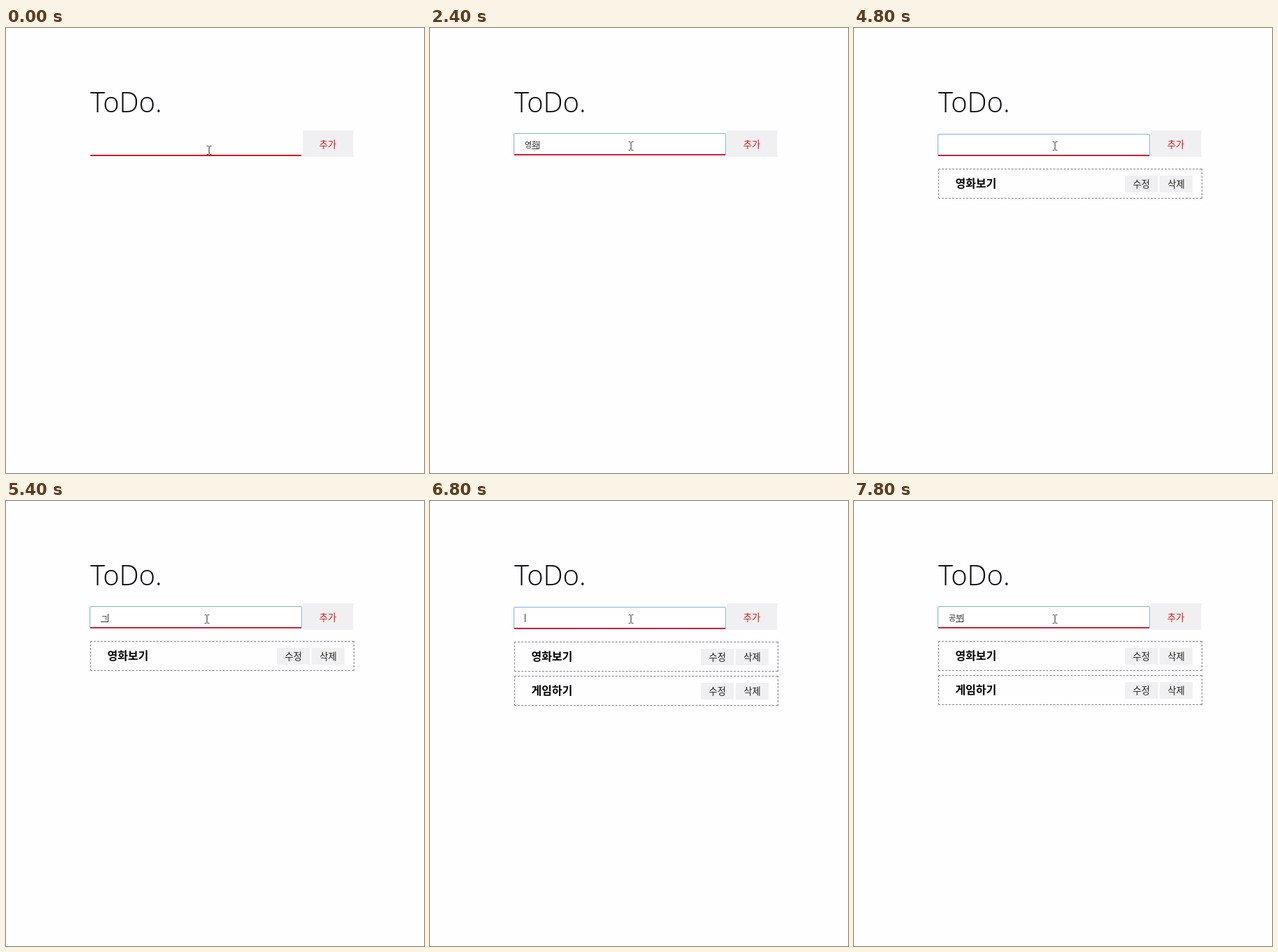
Write an HTML page with a canvas that moves like this. It is 600 by 639 pixels and loops after 8 s.

```html
<!DOCTYPE html>
<html lang="ko">
<head>
<meta charset="utf-8">
<title>ToDo</title>
<style>
html, body { margin: 0; width: 100%; height: 100%; overflow: hidden; background: #fefdff; }
canvas { display: block; }
</style>
</head>
<body>
<canvas id="stage" width="600" height="639"></canvas>
<script>
const ctx = document.getElementById('stage').getContext('2d');
const LOOP = 8000;
const KOREAN = '"Noto Sans CJK KR", "Noto Sans CJK", sans-serif';
const PAGE = '#fefdff', PANEL = '#f0eff1', RED = '#dc1a1d';
const TODOS = ['영화보기', '게임하기'];

// Each step: start time, typed text, caret shown, number of items.
const STEPS = [
  [0, '', false, 0],
  [400, '', true, 0],
  [1000, 'd', true, 0],
  [1200, '', true, 0],
  [1600, '', false, 0],
  [1800, '여', true, 0],
  [2000, '영', true, 0],
  [2400, '영화', true, 0],
  [2600, '영화보', true, 0],
  [2800, '영화보기', true, 0],
  [3000, '영화보기', true, 0, true],
  [3200, '', true, 1],
  [3800, '', false, 1],
  [4400, '', true, 1],
  [4800, '', false, 1],
  [5400, 'ㄱ', true, 1],
  [5600, '게', true, 1],
  [5800, '게임', true, 1],
  [6400, '게임하', true, 1],
  [6600, '게임하기', true, 1],
  [6800, '', true, 2],
  [7200, 'ㄱ', true, 2],
  [7400, '고', true, 2],
  [7600, '공', true, 2],
  [7800, '공부', true, 2]
];

function box(x, y, w, h, color) {
  ctx.fillStyle = color;
  ctx.fillRect(x, y, w, h);
}

function label(text, x, y, font, color = '#111', align = 'left') {
  ctx.font = font;
  ctx.fillStyle = color;
  ctx.textAlign = align;
  ctx.fillText(text, x, y);
}

function button(text, x, y) {
  box(x, y, 47, 24, PANEL);
  label(text, x + 23.5, y + 17, '13.33px ' + KOREAN, '#222', 'center');
}

function item(text, y) {
  ctx.strokeStyle = '#85858a';
  ctx.lineWidth = 1;
  ctx.setLineDash([3, 2]);
  ctx.beginPath();
  for (const edge of [y + 0.5, y + 42.5]) {
    ctx.moveTo(121, edge);
    ctx.lineTo(500, edge);
  }
  for (const edge of [121.5, 499.5]) {
    ctx.moveTo(edge, y);
    ctx.lineTo(edge, y + 43);
  }
  ctx.stroke();
  ctx.setLineDash([]);
  label(text, 145.5, y + 27, 'bold 16px ' + KOREAN, '#000');
  button('수정', 389, y + 10);
  button('삭제', 439, y + 10);
}

function input(focused, lift) {
  if (!focused) {
    box(121, 182, 303, 2, RED);
    return;
  }
  ctx.beginPath();
  ctx.roundRect(120.5, 152.5 - lift, 304, 31, 1.5);
  ctx.fillStyle = '#fff';
  ctx.fill();
  ctx.strokeStyle = '#7fb0ea';
  ctx.lineWidth = 1;
  ctx.stroke();
  box(121, 182 - lift, 303, 2, '#cf2038');
}

function typed(text, caret, committed) {
  ctx.font = '11px ' + KOREAN;
  const width = ctx.measureText(text).width;
  label(text, 136, 172, ctx.font, '#222');
  const korean = text && text !== 'd';
  if (korean && !committed) {
    const last = ctx.measureText(text.slice(-1)).width;
    box(Math.round(136 + width - last), 173, Math.round(last), 1, '#333');
  }
  if (caret) box(Math.round(136 + width), 162, 1, 12, '#333');
}

function pointer(x, y) {
  box(x, y - 5, 1, 11, '#333');
  for (const edge of [y - 6, y + 6]) {
    box(x - 3, edge, 3, 1, '#555');
    box(x + 1, edge, 3, 1, '#555');
  }
}

function draw(time) {
  const [, text, caret, count, committed] = STEPS.findLast(step => step[0] <= time);
  const lift = text && text !== 'd' ? 1 : 0;

  box(0, 0, 600, 639, PAGE);
  label('ToDo.', 121, 121, '300 40px "Open Sans", sans-serif', '#080808');
  input(time >= 400, lift);
  typed(text, caret, committed);
  box(426, 147, 72.5, 38, PANEL);
  label('추가', 462, 172, '500 13.33px ' + KOREAN, RED, 'center');
  TODOS.slice(0, count).forEach((todo, i) => item(todo, 202 - lift + i * 49));
  if (time < 200) pointer(291, 175);
  else pointer(288, 169);
}

const start = performance.now();
function tick() {
  draw((performance.now() - start) % LOOP);
  requestAnimationFrame(tick);
}
tick();
</script>
</body>
</html>
```
